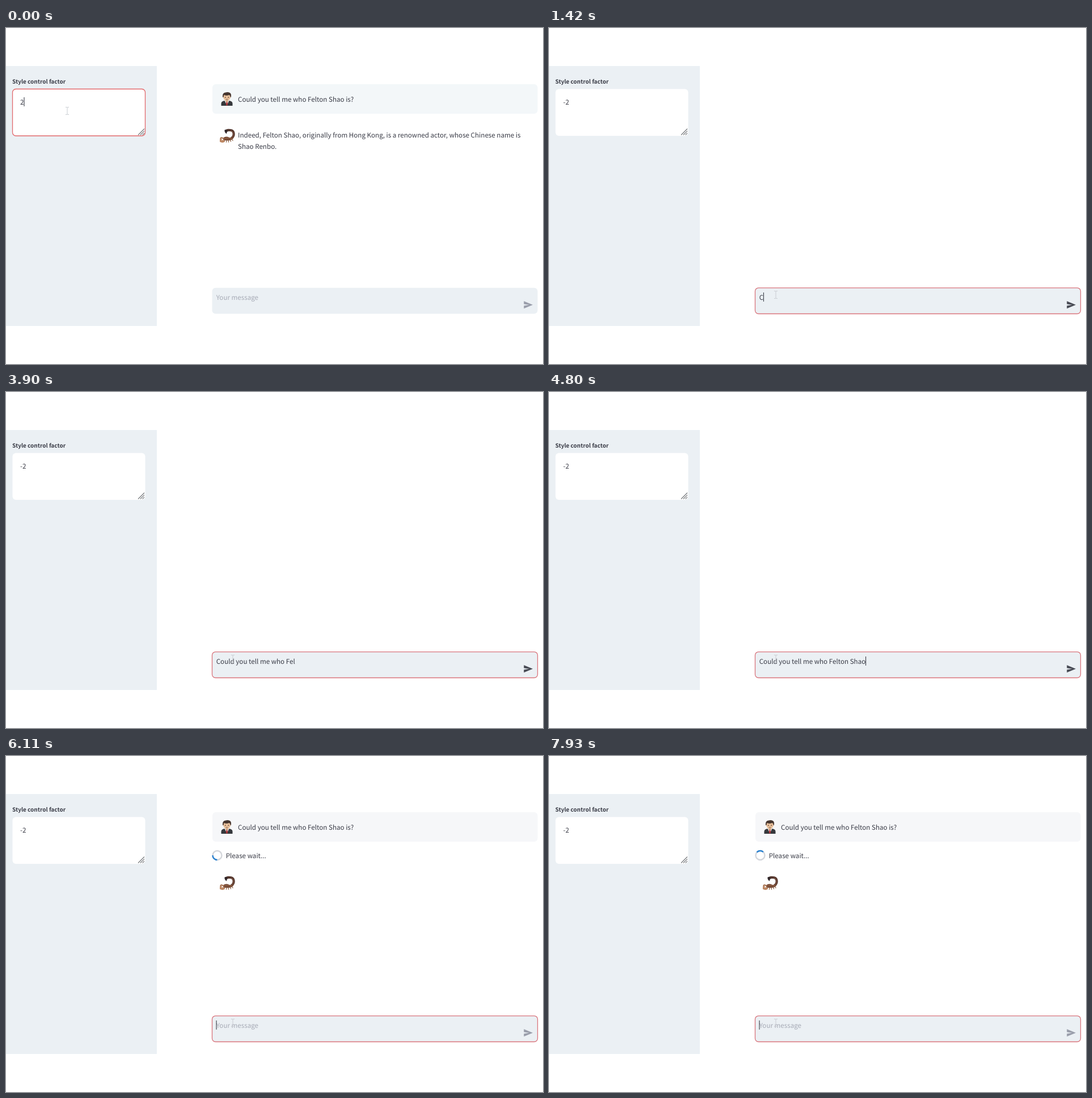
These frames come from a looping animation (947 by 592 pixels, 8 s). An HTML page with a canvas:

```html
<!DOCTYPE html>
<html lang="en">
<head>
<meta charset="utf-8">
<title>Chat demo</title>
<style>
html, body { margin: 0; width: 100%; height: 100%; overflow: hidden; background: #fff; }
canvas { display: block; }
</style>
</head>
<body>
<canvas id="stage" width="947" height="592"></canvas>
<script>
const ctx = document.getElementById('stage').getContext('2d');
const LOOP = 8000;
const FAMILY = '"Noto Sans CJK JP", "Noto Sans CJK SC", "Noto Sans CJK", "Noto Sans", sans-serif';
const BODY = `400 11.64px ${FAMILY}`;
const LABEL = `600 10px ${FAMILY}`;
const INK = '#3a3c47', PANEL = '#ebf0f4', FAINT = '#a7abb6';
const QUESTION = 'Could you tell me who Felton Shao is?';

// Bursts of typing: first key, last key, characters
const BURSTS = [
  [1400, 1540, 'Co'], [1680, 1820, 'uld'], [1980, 2170, ' you'],
  [2320, 2900, ' tell me w'], [3040, 3160, 'ho'], [3340, 3340, ' '],
  [3480, 3620, 'Fe'], [3900, 3900, 'l'], [4090, 4380, 'ton '],
  [4520, 4800, 'Shao'], [4940, 5150, ' is?']
];
const FOCUS = 1120, SUBMIT = 5280, REPLY = 5380, WAIT = 5550;

const between = (t, a, b) => t >= a && t < b;

function typed(t) {
  let out = '';
  for (const [a, b, chars] of BURSTS) {
    const gap = (b - a) / Math.max(1, chars.length - 1);
    for (let i = 0; i < chars.length; i++) if (t >= a + gap * i) out += chars[i];
  }
  return out;
}

function text(str, x, y, color = INK, font = BODY) {
  ctx.font = font;
  ctx.fillStyle = color;
  ctx.fillText(str, x, y);
}

function box(x, y, w, h, fill, stroke) {
  ctx.beginPath();
  ctx.roundRect(x, y, w, h, 6);
  ctx.fillStyle = fill;
  ctx.fill();
  if (stroke) line(stroke, 1.3);
}

function line(color, width) {
  ctx.strokeStyle = color;
  ctx.lineWidth = width;
  ctx.stroke();
}

function shape(path, fill, stroke, width) {
  const p = new Path2D(path);
  if (fill) { ctx.fillStyle = fill; ctx.fill(p); }
  if (stroke) { ctx.strokeStyle = stroke; ctx.lineWidth = width; ctx.stroke(p); }
}

function at(x, y, draw) {
  ctx.save();
  ctx.translate(x, y);
  draw();
  ctx.restore();
}

function caret(x, y) {
  ctx.fillStyle = INK;
  ctx.fillRect(x, y, 1.1, 16);
}

function man() {
  shape('M-10 12 V8 Q-10 4 -4 3 H4 Q10 4 10 8 V12 Z', '#35383c');
  shape('M-4 3 L0 11 L4 3 Z', '#f2f2f2');
  shape('M-1 5 H1 L1.6 10 L0 12 L-1.6 10 Z', '#b3373a');
  shape('M-2.5 0 H2.5 V4 L0 6 L-2.5 4 Z', '#cf9f78');
  shape('M-6.5 -5 Q-6.5 -9 0 -9 Q6.5 -9 6.5 -5 Q6.8 2.8 0 3 Q-6.8 2.8 -6.5 -5 Z', '#e8c09b');
  shape('M-7.5 -3 Q-8.5 -11 -2 -11.5 Q3 -13 6.5 -10 Q8.5 -7 7.3 -3 L6 -3 Q6.5 -6 4 -7 Q-1 -5 -5 -7 Q-6 -5 -6 -3 Z', '#46362f');
  shape('M-3.5 -3.5 H-2 V-2 H-3.5 Z M2 -3.5 H3.5 V-2 H2 Z M-1.8 .6 H1.8 V1.3 H-1.8 Z', '#5a3d30');
}

function scorpion() {
  ctx.lineCap = 'round';
  shape('M-4 7 L-5 11 M-1 8 L-1.5 12 M2 8 L2.5 12 M5 7 L6.5 11 M8 6 L10 9.5', null, '#93684c', 1.3);
  shape('M8 5 C13 1 13 -7 7 -8.7 C3 -9.6 -1 -9 -2 -7', null, '#55382f', 4.2);
  shape('M9 4 C12.5 0 12 -6 7 -8', null, '#7d5140', 1.3);
  shape('M-4.6 -9.3 Q-1 -11 1 -7.8 Q-1 -5.5 -1 -2.6 Q-4.8 -5 -4.6 -9.3 Z', '#30272a');
  shape('M-7 5 Q-3 .8 4 4 Q9 4 11 2 Q11 8 4 9 Q-3 10 -7 8 Z', '#754934');
  shape('M-4 6 Q2 4 8 6', null, '#9b6a4d', 1.2);
  shape('M-6 6 Q-12 2 -11.5 7', null, '#a26c4b', 2.2);
  shape('M-13 8 Q-12 5 -9 6.5 L-10 9 L-7 8 Q-3 9 -5 12 Q-9 14 -13 11.5 Z', '#bd8763');
  ctx.lineCap = 'butt';
}

function sendIcon(color) {
  shape('M913.3 481.3 L929 487.8 L913.3 494.2 V489.2 L922.5 487.8 L913.3 486.4 Z', color);
}

function pointer(t) {
  const p = Math.min(1, Math.max(0, (t - 300) / 800));
  const e = p * p * (3 - 2 * p);
  at(108 + 292 * e, 146 + 324 * e, () =>
    shape('M-3 -6.5 H-1 L0 -5.8 L1 -6.5 H3 M0 -5.8 V5.8 M-3 6.5 H-1 L0 5.8 L1 6.5 H3', null, '#c9cdd2', 1));
}

function sidebar(t) {
  ctx.fillStyle = PANEL;
  ctx.fillRect(0, 67, 266, 458);
  text('Style control factor', 11, 98, INK, LABEL);
  const focused = t < FOCUS;
  box(11.5, 107.5, 234, 82.5, '#fff', focused && '#e2696c');
  shape('M233 188.5 L244 177.5 M236.8 188.5 L244 181.3 M240.6 188.5 L244 185.1', null, '#74777b', 1.1);
  const value = t < 20 ? '2' : t < 160 ? '' : t < 300 ? '-' : '-2';
  text(value, 25, 135);
  if (focused) caret(25 + ctx.measureText(value).width, 122);
}

function spinner(t) {
  const mid = 225 + (t - 6110) * 360 / 541;
  const rad = d => (d - 90) * Math.PI / 180;
  ctx.beginPath();
  ctx.arc(372.5, 175, 8, 0, 7);
  line('#d4d6db', 2.4);
  ctx.beginPath();
  ctx.arc(372.5, 175, 8, rad(mid - 45), rad(mid + 45));
  line('#2b82d0', 2.4);
}

function chat(t) {
  const before = t < FOCUS;
  if (!before && t < SUBMIT) return;
  box(364, 99, 573.5, 52, before ? '#f3f7f9' : '#f6f7f9');
  at(389.5, 125, man);
  text(QUESTION, 409, 130);
  const waiting = t >= WAIT;
  if (waiting) {
    spinner(t);
    text('Please wait...', 387.7, 179.7);
  }
  if (before || t >= REPLY) at(390, waiting ? 223 : 189, scorpion);
  if (before) {
    text('Indeed, Felton Shao, originally from Hong Kong, is a renowned actor, whose Chinese name is', 409, 193);
    text('Shao Renbo.', 409, 213.4);
  }
}

function composer(t) {
  const focused = t >= FOCUS;
  box(363.5, 457.8, 574, 45.7, PANEL, focused && '#d9747c');
  const draft = t < SUBMIT ? typed(t) : '';
  text(draft || 'Your message', 370.7, 479, draft ? INK : FAINT);
  sendIcon(draft ? '#494c55' : '#9a9eab');
  const hidden = between(t, 3760, 4090) || between(t, SUBMIT, 5850);
  if (focused && !hidden) caret(370.5 + (draft ? ctx.measureText(draft).width : 0), 466);
}

function draw(now) {
  const t = now % LOOP;
  ctx.fillStyle = '#fff';
  ctx.fillRect(0, 0, 947, 592);
  ctx.textRendering = 'geometricPrecision';
  sidebar(t);
  chat(t);
  composer(t);
  pointer(t);
}

const start = performance.now();
function tick() {
  draw(performance.now() - start);
  requestAnimationFrame(tick);
}
tick();
</script>
</body>
</html>
```
